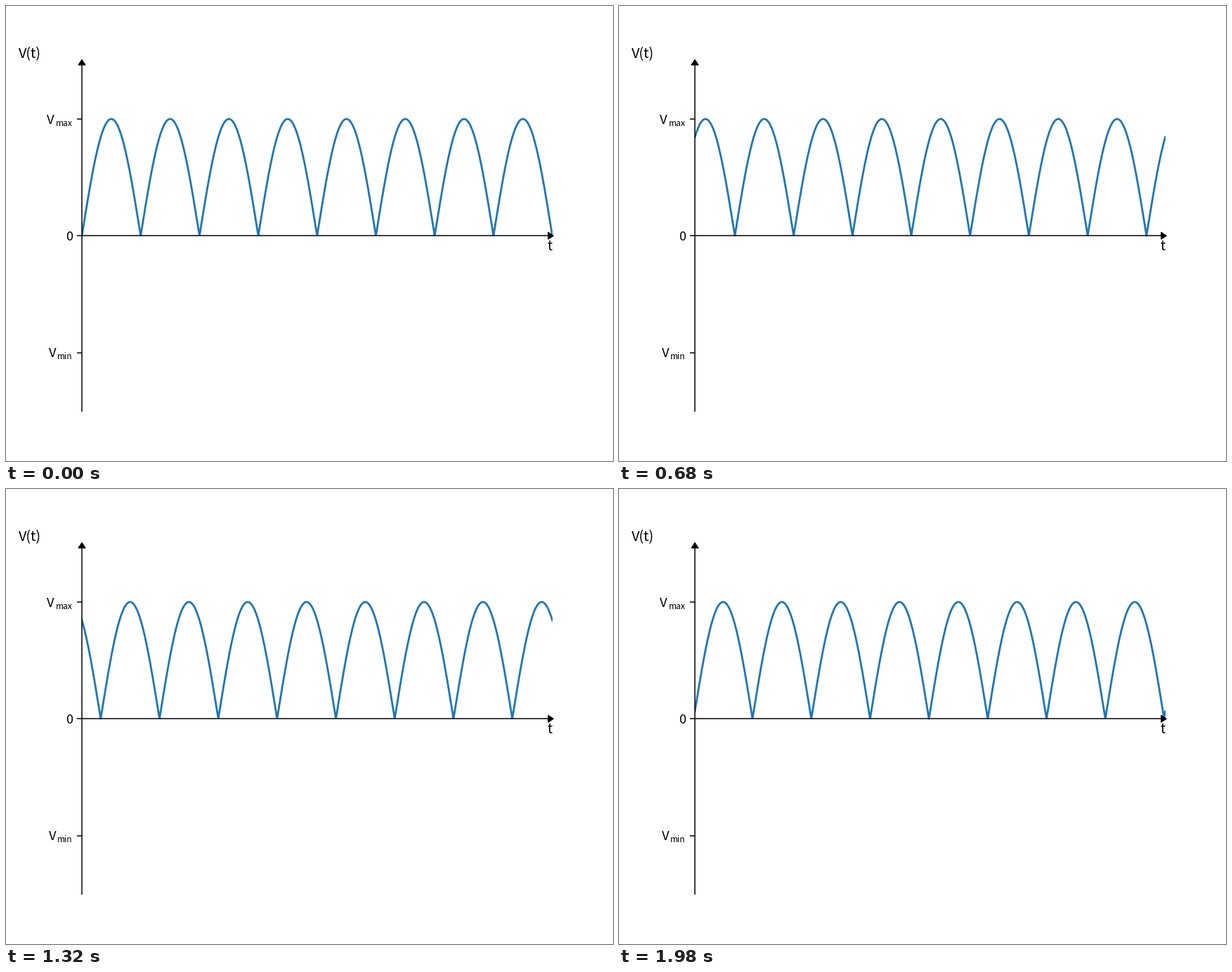
These frames come from a looping animation (864 px wide and 648 px high, 2000 ms). A matplotlib script:

```python
import matplotlib.pyplot as plt
import numpy as np
from matplotlib.animation import FuncAnimation
from matplotlib.patches import Polygon

W, H, DPI = 864, 648, 135
FRAMES, INTERVAL = 100, 20
HUMPS, PERIOD = 8, 1000  # humps on the axis, ms to travel one hump

plt.rcParams["font.family"] = "Noto Sans CJK JP"

fig = plt.figure(figsize=(W / DPI, H / DPI), dpi=DPI, facecolor="white")
ax = fig.add_axes([0.125, 0.11, 0.775, 0.77])
ax.set_xlim(0, 1)
ax.set_ylim(-1.5, 1.5)
ax.set_xticks([])
ax.set_yticks([-1, 0, 1], labels=[])
ax.spines[["top", "right"]].set_visible(False)
ax.spines["bottom"].set_position("zero")


def to_fig(x, y):
    """Stage pixels (origin top left) to figure fractions."""
    return x / W, 1 - y / H


def label(x, y, text, size=10, ha="left"):
    fig.text(*to_fig(x, y), text, size=size, ha=ha, va="baseline")


def arrowhead(points):
    fig.add_artist(Polygon([to_fig(*p) for p in points], closed=True,
                           fc="black", ec="black", lw=0.75,
                           joinstyle="round"))


AXIS_X, AXIS_Y = 108, 327.24
arrowhead([(779, AXIS_Y), (771.8, AXIS_Y - 4.8), (771.8, AXIS_Y + 4.8)])
arrowhead([(AXIS_X, 76.7), (AXIS_X - 4.8, 83.9), (AXIS_X + 4.8, 83.9)])

label(33.5, 73.7, "V(t)", 10.5, "center")
label(774, 348.3, "t", ha="center")
label(94.8, 333.7, "0", 9.6, "right")
for base, x, sub in ((167.8, 58, "max"), (500.3, 61, "min")):
    label(x, base, "V", 9.8)
    label(95, base + 2.8, sub, 6.4, "right")

u = np.linspace(0, 1, 1000)
wave, = ax.plot(u, np.zeros_like(u), color="#1f77b4", lw=1.5)


def update(i):
    shift = i * INTERVAL / PERIOD
    wave.set_ydata(np.abs(np.sin(np.pi * (HUMPS * u - shift))))
    return wave,


anim = FuncAnimation(fig, update, frames=FRAMES, interval=INTERVAL,
                     repeat=True, repeat_delay=0)
plt.show()
```
